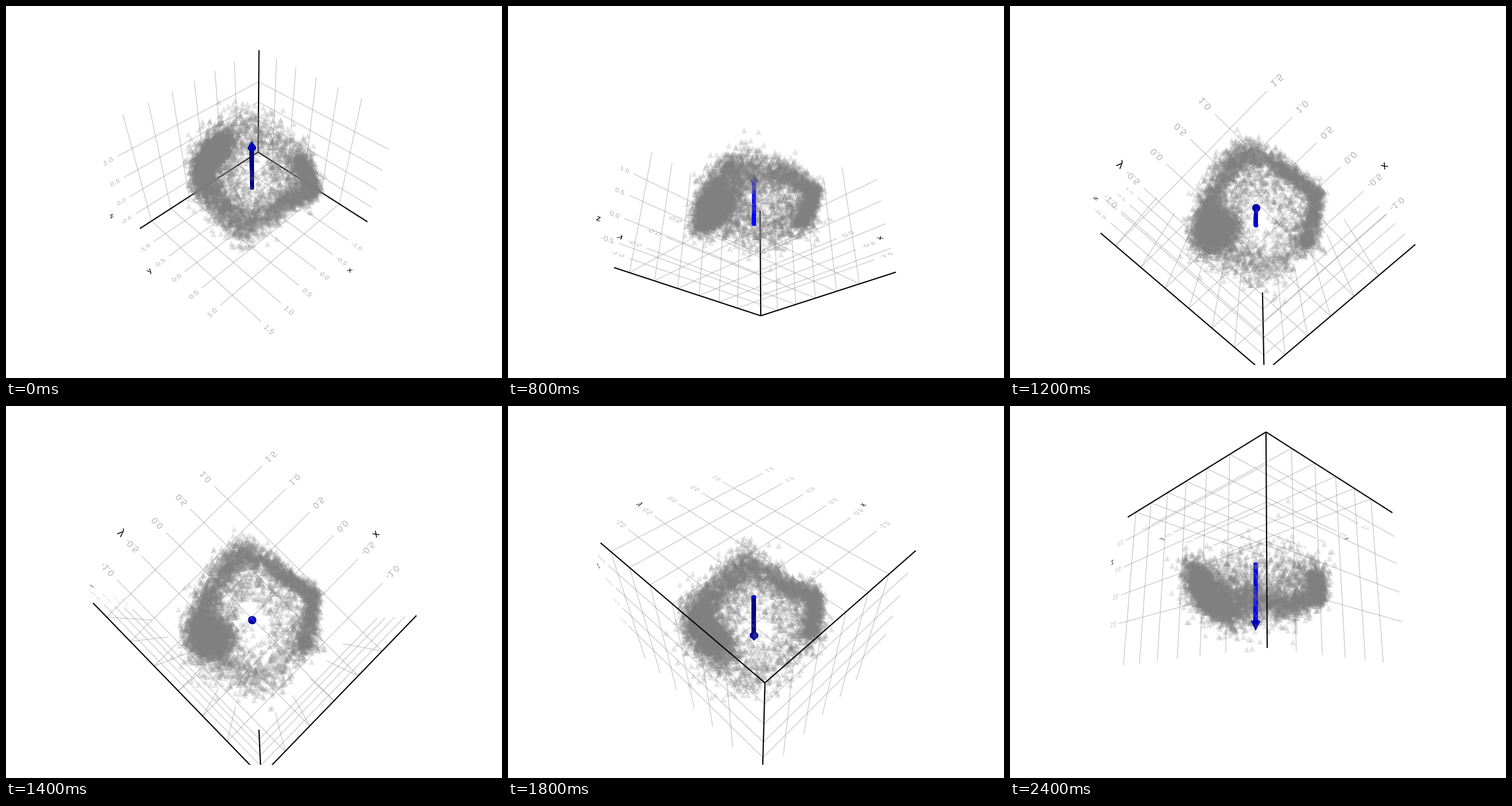
Write a matplotlib script that moves like this. It is 864x648 px and loops after 2500 ms.

```python
import numpy as np
import matplotlib.pyplot as plt
from matplotlib.animation import FuncAnimation
from matplotlib.collections import LineCollection, PolyCollection
from matplotlib.patches import PathPatch
from matplotlib.path import Path
from matplotlib.textpath import TextPath

W, H, DPI = 864, 648, 72
CLIP_Y = 625                      # the scene ends a little above the stage's edge
FRAMES, INTERVAL = 25, 100
ELEV0, STEP = 45.26, 10.0         # camera elevation and its change per frame, degrees

# perspective camera orbiting in the vertical plane through (1, 1)
CENTER = np.array([0.312, 0.373, 0.383])
DIST, FOCAL = 7.43, 724.0
MID_X, MID_Y = W / 2 + 0.5, H / 2 + 0.5
R2 = np.sqrt(2)

LO = np.array([-1.68, -1.484, -0.95])
HI = np.array([1.79, 1.727, 1.716])
TICKS = [np.arange(-1, 1.6, 0.5), np.arange(-1, 1.1, 0.5), np.arange(-0.5, 1.1, 0.5)]
TICK_SIZE, NAME_SIZE = 0.133, 0.16
GAP, NAME_GAP = 0.1, 0.415

GREY = (0.5, 0.5, 0.5)
GRID = GREY + (0.4,)
TICK_COLOR = GREY + (0.6,)
MARK = GREY + (0.2,)


def project(p, e):
    """Screen positions and distances from the camera of points p."""
    q = np.asarray(p, float) - CENTER
    u = (q[..., 1] - q[..., 0]) / R2
    h = (q[..., 0] + q[..., 1]) / R2
    z = q[..., 2]
    depth = DIST - h * np.cos(e) - z * np.sin(e)
    rise = z * np.cos(e) - h * np.sin(e)
    k = FOCAL / depth
    return np.stack([MID_X + u * k, MID_Y - rise * k], -1), depth


def at(base, **coords):
    p = np.array(base, float)
    for name, value in coords.items():
        p["xyz".index(name)] = value
    return p


# ---- axes ----

def build_grid():
    floor, walls = [], []
    for x in TICKS[0]:
        a = at(LO, x=x)
        floor.append([a, at(a, y=HI[1])])
        walls.append([a, at(a, z=HI[2])])
    for y in TICKS[1]:
        a = at(LO, y=y)
        floor.append([a, at(a, x=HI[0])])
        walls.append([a, at(a, z=HI[2])])
    for z in TICKS[2]:
        a = at(LO, z=z)
        walls.append([a, at(a, x=HI[0])])
        walls.append([a, at(a, y=HI[1])])
    return np.array(floor), np.array(walls)


def text3d(s, pos, run, up, size, mid, right):
    """Outline of a text lying in the plane of run and up."""
    tp = TextPath((0, 0), s, size=size, prop={"family": "Liberation Sans"})
    x, y = tp.vertices.T
    if right:
        x = x - (x.max() + 0.04 * size)
    y = y - mid * size
    pts = pos + np.outer(x, run) + np.outer(y, up)
    return pts, tp.codes


def build_labels():
    ex, ey, ez = np.eye(3)
    # per axis: run, up, direction away from the box, right aligned
    styles = [(ey, -ex, ey, False), (-ex, -ey, ex, True), (-ex, ez, ex, True)]
    floor, walls = [], []
    for i, (run, up, out, right) in enumerate(styles):
        group = walls if i == 2 else floor
        edge = LO * (1 - out) + HI * out
        for t in TICKS[i]:
            pos = edge + GAP * out
            pos[i] = t
            group.append((*text3d(f"{t:.1f}", pos, run, up, TICK_SIZE, 0.36, right), TICK_COLOR))
        pos = edge + NAME_GAP * out
        pos[i] = LO[i] + (TICKS[i][-1] - TICKS[i][0]) / 2
        group.append((*text3d("xyz"[i], pos, run, up, NAME_SIZE, 0.26, right), "black"))
    return floor, walls


# ---- point cloud, in (sideways, towards the viewer, up) around the origin ----

# corners of the ring: position, points up to the next corner, spread
RING = np.array([
    (-0.95, -0.10, 0.38, 430, 0.10),
    (-0.78, 0.48, 0.40, 360, 0.11),
    (-0.45, 0.98, 0.48, 300, 0.13),
    (-0.18, 1.24, 0.32, 270, 0.13),
    (0.25, 1.06, 0.45, 270, 0.10),
    (0.62, 0.78, 0.56, 430, 0.08),
    (1.10, 0.46, 0.42, 330, 0.07),
    (1.03, 0.00, 0.40, 330, 0.07),
    (0.91, -0.42, 0.37, 220, 0.15),
    (0.15, -1.08, 0.55, 240, 0.18),
    (-0.50, -0.80, 0.62, 250, 0.18),
])


def build_cloud():
    rng = np.random.default_rng(4)
    parts = []

    # dense blob bent along the unit sphere, with a looser halo
    for n, spread in ((1700, 1.0), (750, 1.6)):
        k = np.clip(rng.normal(0.42, 0.27, n), -0.2, 1.25)[:, None]
        spine = np.array([-1.0, -0.22, 0.22]) * (1 - k) + np.array([-0.38, -0.34, 0.95]) * k
        spine = spine + np.clip(4 * k * (1 - k), -0.5, 1) * np.array([-0.05, -0.02, 0.05])
        parts.append(spine + rng.normal(0, spread, (n, 3)) * (0.085, 0.18, 0.1))

    for a, b in zip(RING, np.roll(RING, -1, 0)):
        n = int(a[3])
        k = rng.uniform(0, 1, (n, 1))
        sigma = a[4] + (b[4] - a[4]) * k
        jitter = rng.normal(0, 1, (n, 3)) * sigma * (1, 1, 1.5)
        parts.append(a[:3] * (1 - k) + b[:3] * k + jitter)

    # sparse filling between the ring and the middle
    inner = rng.permutation(np.concatenate(parts[2:]))[:750]
    parts.append(inner * rng.uniform(0.3, 1, (750, 1)) ** (0.8, 0.8, 0)
                 + rng.normal(0, 1, (750, 3)) * (0.1, 0.1, 0.26))

    parts.append((-0.42, 0.98, 0.60) + rng.normal(0, 0.035, (110, 3)))
    parts.append((0.93, -0.40, 0.36) + rng.normal(0, 0.06, (130, 3)))
    u, h, z = np.concatenate(parts).T
    return np.stack([(h - u) / R2, (h + u) / R2, z], -1)


# ---- arrow ----

def ring(radius, z, n=28):
    a = np.linspace(0, 2 * np.pi, n, endpoint=False)
    return np.stack([radius * np.cos(a), radius * np.sin(a), np.full(n, z)], -1)


def sides(a, b):
    return np.stack([a, b, np.roll(b, -1, 0), np.roll(a, -1, 0)], 1)


TAIL, NECK, BASE = ring(0.036, 0), ring(0.036, 1), ring(0.075, 1)
TIP = np.tile([0, 0, 1.145], (len(BASE), 1))
SHAFT, CONE = sides(TAIL, NECK), sides(BASE, TIP)

GRID_FLOOR, GRID_WALLS = build_grid()
TEXT_FLOOR, TEXT_WALLS = build_labels()
CLOUD = build_cloud()
AXES = [np.array([LO, at(LO, **{c: HI["xyz".index(c)]})]) for c in "xyz"]

fig = plt.figure(figsize=(W / DPI, H / DPI), dpi=DPI, facecolor="white")
ax = fig.add_axes([0, 1 - CLIP_Y / H, 1, CLIP_Y / H])
artists = []


def show(artist):
    ax.add_artist(artist)
    artists.append(artist)


def draw_lines(lines, e, color, width, z):
    xy, _ = project(lines, e)
    show(LineCollection(xy, colors=[color], linewidths=width, zorder=z))


def draw_texts(texts, e, z):
    for pts, codes, color in texts:
        xy, _ = project(pts, e)
        show(PathPatch(Path(xy, codes), facecolor=color, lw=0, zorder=z))


def draw_faces(faces, e, blue, z):
    xy, _ = project(faces, e)
    color = (0, 0, blue)
    show(PolyCollection(xy, facecolors=[color], edgecolors=[color], linewidths=0.4, zorder=z))


def draw_arrow(e, eye_z):
    lit = 0.75 + 0.25 * np.cos(2 * (e + np.radians(35)))
    below = eye_z < 1
    draw_faces(SHAFT, e, lit, 4.2)
    draw_faces(CONE, e, 0.7, 4.0 if below else 4.4)
    if below:
        draw_faces(BASE[None], e, 0.62, 4.1)
    if eye_z < 0:
        draw_faces(TAIL[None], e, 0.9, 4.3)


def draw_cloud(e):
    xy, depth = project(CLOUD, e)
    _, middle = project(np.array([0, 0, 0.5]), e)
    for part, z in ((depth >= middle, 3), (depth < middle, 5)):
        artists.append(ax.scatter(*xy[part].T, s=10.5 ** 2, marker="^",
                                  color=[MARK], linewidths=0, zorder=z))


def update(i):
    while artists:
        artists.pop().remove()
    e = np.radians(ELEV0 - STEP * i)
    eye = CENTER + DIST * np.array([np.cos(e) / R2, np.cos(e) / R2, np.sin(e)])
    floor_front = eye[2] < LO[2]
    walls_front = eye[0] < LO[0]
    zf = 6 if floor_front else 1
    zw = 6 if walls_front else 1

    draw_lines(GRID_FLOOR, e, GRID, 1.4, zf)
    draw_lines(GRID_WALLS, e, GRID, 1.4, zw)
    draw_texts(TEXT_FLOOR, e, zf + 0.2)
    draw_texts(TEXT_WALLS, e, zw + 0.2)
    draw_lines(AXES[:2], e, "black", 2.1, max(zf, zw) + 0.4)
    draw_lines(AXES[2:], e, "black", 2.1, zw + 0.4)
    draw_cloud(e)
    draw_arrow(e, eye[2])
    ax.set(xlim=(0, W), ylim=(CLIP_Y, 0))
    ax.axis("off")
    return artists


anim = FuncAnimation(fig, update, frames=FRAMES, interval=INTERVAL,
                     init_func=lambda: artists, repeat=True, repeat_delay=0, blit=False)
plt.show()
```
